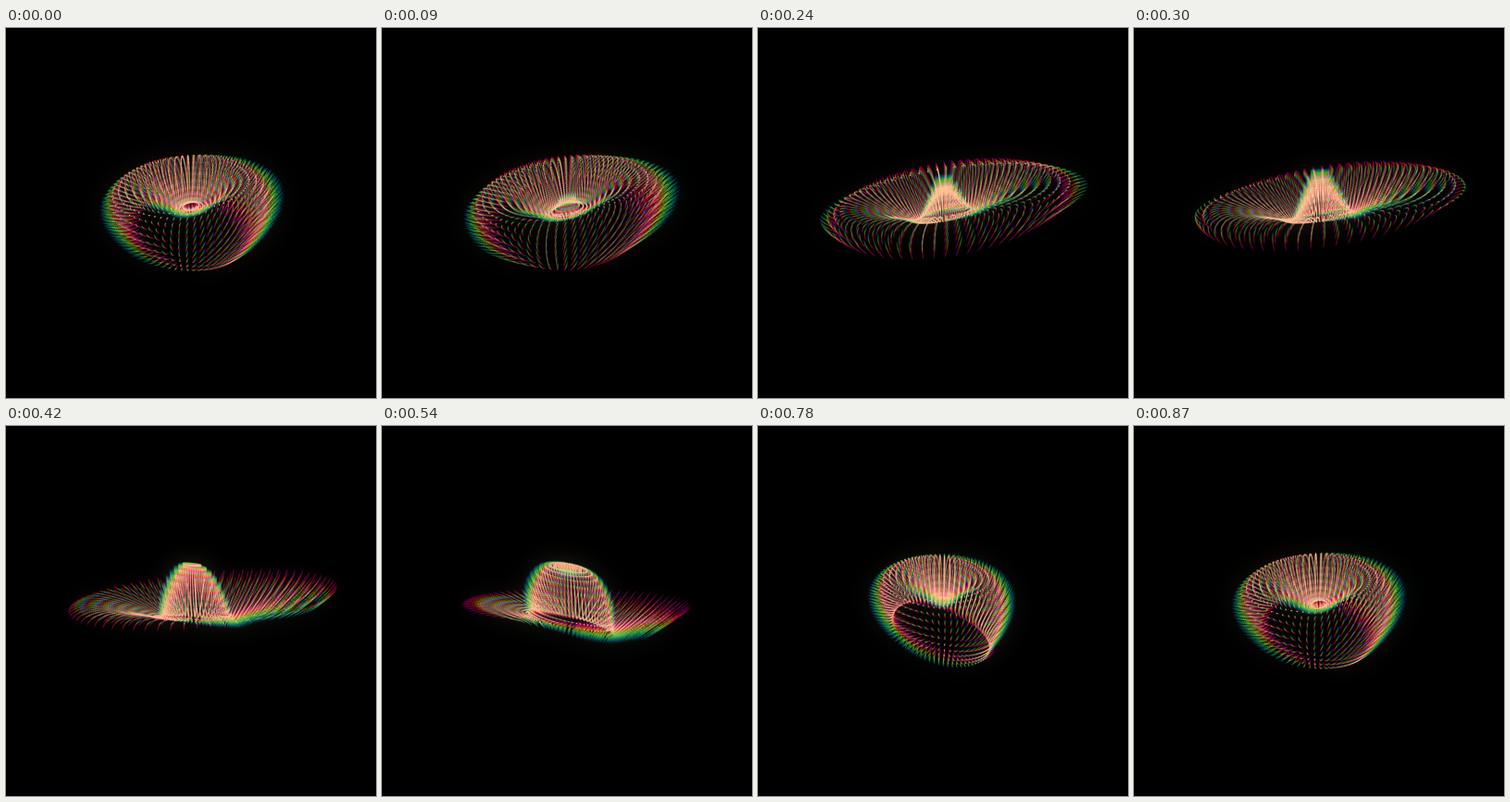
An HTML page with a canvas that plays this animation: 400x400 px, repeating every 900 ms.

```html
<!DOCTYPE html>
<html lang="en">
<head>
<meta charset="utf-8">
<title>Ripple</title>
<style>
html, body { margin: 0; width: 100%; height: 100%; overflow: hidden; background: #000; }
canvas { display: block; width: 400px; height: 400px; }
</style>
</head>
<body>
<canvas id="stage" width="400" height="400"></canvas>
<script>
const stage = document.getElementById('stage');
const ctx = stage.getContext('2d');
const layer = document.createElement('canvas');
layer.width = layer.height = 400;
const pen = layer.getContext('2d');

const LOOP = 900, STEP = 30, MID = 200;
const RINGS = 20, SPOKES = 72;
const TRAIL = 120, PARTS = 10, SPAN = 2;
const cosDeg = a => Math.cos(a * Math.PI / 180);
const sinDeg = a => Math.sin(a * Math.PI / 180);

const spokes = Array.from({ length: SPOKES }, (_, i) => {
  const a = (i + 0.5) / SPOKES * 360;
  return { cos: cosDeg(a), sin: sinDeg(a) };
});

// Tail is magenta, head is blue; together they add up to salmon.
const colors = Array.from({ length: PARTS }, (_, i) =>
  `hsl(${-50 + 260 * (i / (PARTS - 1)) ** 1.5} 100% 50%)`);

// A ripple running outwards on a disc whose axis precesses.
function ringAt(u, ms) {
  const turn = ms / LOOP * 360;
  const wave = cosDeg(turn - 115 - 405 * u + 50 * u * u);
  const radius = 98 * u + 46 * u * u * wave;
  const lean = turn - 30 - 45 * u * u;
  return {
    x: u * (5 + 7 * cosDeg(turn - 120)),
    y: -32 + 34 * u - (22 - 2 * u) * wave,
    radius,
    tilt: -20 * u * cosDeg(lean),
    depth: 0.33 * radius - 20 * u * sinDeg(lean)
  };
}

function project(ring, s) {
  const near = 1 + 0.0012 * ring.radius * s.sin;
  return [
    MID + near * (ring.x + ring.radius * s.cos),
    MID + near * (ring.y + ring.tilt * s.cos + ring.depth * s.sin)
  ];
}

function drawPart(k, ms) {
  const start = ms - TRAIL + TRAIL * k / (PARTS + SPAN - 1);
  const end = start + TRAIL * SPAN / (PARTS + SPAN - 1);
  pen.strokeStyle = colors[k];
  pen.beginPath();
  for (let i = 0; i < RINGS; i++) {
    const u = (i + 2) / (RINGS + 1);
    const from = ringAt(u, start), to = ringAt(u, end);
    for (const s of spokes) {
      pen.moveTo(...project(from, s));
      pen.lineTo(...project(to, s));
    }
  }
  pen.stroke();
}

function draw(ms) {
  pen.globalCompositeOperation = 'source-over';
  pen.globalAlpha = 1;
  pen.fillStyle = '#000';
  pen.fillRect(0, 0, 400, 400);
  pen.globalCompositeOperation = 'lighter';
  pen.globalAlpha = 0.14;
  pen.lineWidth = 1.3;
  pen.lineCap = 'round';
  for (let k = 0; k < PARTS; k++) drawPart(k, ms);

  ctx.globalCompositeOperation = 'source-over';
  ctx.globalAlpha = 1;
  ctx.drawImage(layer, 0, 0);
  ctx.globalCompositeOperation = 'lighter';
  ctx.globalAlpha = 0.22;
  ctx.filter = 'blur(12px)';
  ctx.drawImage(layer, 0, 0);
  ctx.filter = 'none';
}

let shown = -1;
function tick() {
  const step = Math.floor(performance.now() % LOOP / STEP);
  if (step !== shown) draw((shown = step) * STEP);
  requestAnimationFrame(tick);
}
tick();
</script>
</body>
</html>
```
